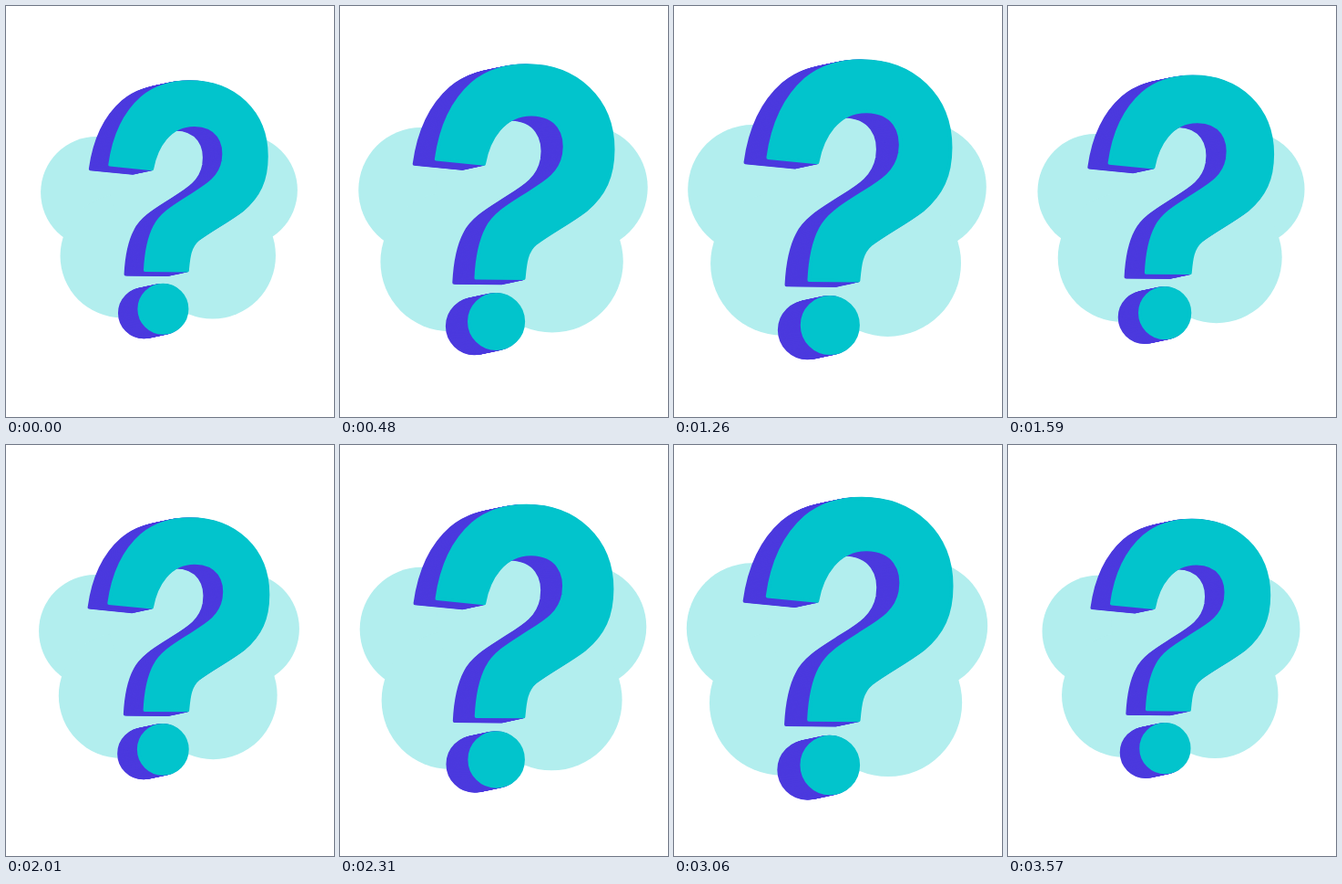
An HTML page that plays this animation: 360 by 450 pixels, repeating every 3.6 s.

```html
<!DOCTYPE html>
<html lang="en">
<head>
<meta charset="utf-8">
<title>Pulsing question mark</title>
<style>
  html, body { margin: 0; width: 100%; height: 100%; overflow: hidden; background: #fff; }
  svg { display: block; width: 360px; height: 450px; }
  .cloud { fill: #b2eeee; }
  .side { fill: #4b39de; stroke: #4b39de; }
  .face { fill: #02c4cc; stroke: #02c4cc; }
</style>
</head>
<body>
<svg viewBox="0 0 360 450">
  <defs>
    <g id="glyph" stroke-width="4" stroke-linejoin="round">
      <path d="M100 163.500 C105 127 119 95 143 74 C161 59 183 53 207 53
        C266 53 309 93 309 152 C309 184 299 205 277 223.500 C258 238 236 249 218 262.500
        C206 272 205 288 203.500 304 L147 303.500 C148 283 152 260 160 245
        C169 227 190 216 210 203 C231 190 247 180 251 158 C255 132 243 111 213 110.500
        C180 110 162 139 156.500 169 Z"/>
      <circle cx="171" cy="355" r="32"/>
    </g>
  </defs>
  <g id="mark">
    <g class="cloud">
      <circle cx="82" cy="200" r="74"/>
      <circle cx="276" cy="197" r="74"/>
      <circle cx="116" cy="284.5" r="82"/>
      <circle cx="237" cy="284" r="84"/>
      <circle cx="185" cy="190" r="85"/>
    </g>
    <g id="side" class="side"></g>
    <use href="#glyph" class="face"/>
  </g>
</svg>
<script>
  const mark = document.getElementById('mark');
  const side = document.getElementById('side');
  const LOOP = 3600, CX = 179, CY = 223, DRAWN = 342;
  const DEPTH = { x: -26, y: 5.5 }, LAYERS = 26;

  // time in ms and cloud width at each turning point
  const steps = [
    [0, 281.8], [880, 344], [960, 344], [1840, 281.5], [1865, 281.5],
    [2725, 344], [2795, 344], [3655, 281.5]
  ];

  // extrude the glyph by stacking shifted copies
  for (let i = LAYERS; i > 0; i--) {
    const copy = document.createElementNS('http://www.w3.org/2000/svg', 'use');
    copy.setAttribute('href', '#glyph');
    copy.setAttribute('x', DEPTH.x * i / LAYERS);
    copy.setAttribute('y', DEPTH.y * i / LAYERS);
    side.append(copy);
  }

  function widthAt(t) {
    const i = steps.findIndex(s => s[0] > t);
    const [t0, a] = steps[i - 1], [t1, b] = steps[i];
    const ease = (1 - Math.cos(Math.PI * (t - t0) / (t1 - t0))) / 2;
    return a + (b - a) * ease;
  }

  function draw(now) {
    const k = widthAt(now % LOOP) / DRAWN;
    mark.setAttribute('transform', `translate(${CX} ${CY}) scale(${k}) translate(${-CX} ${-CY})`);
  }

  const start = performance.now();
  function tick() {
    draw(performance.now() - start);
    requestAnimationFrame(tick);
  }
  tick();
</script>
</body>
</html>
```
